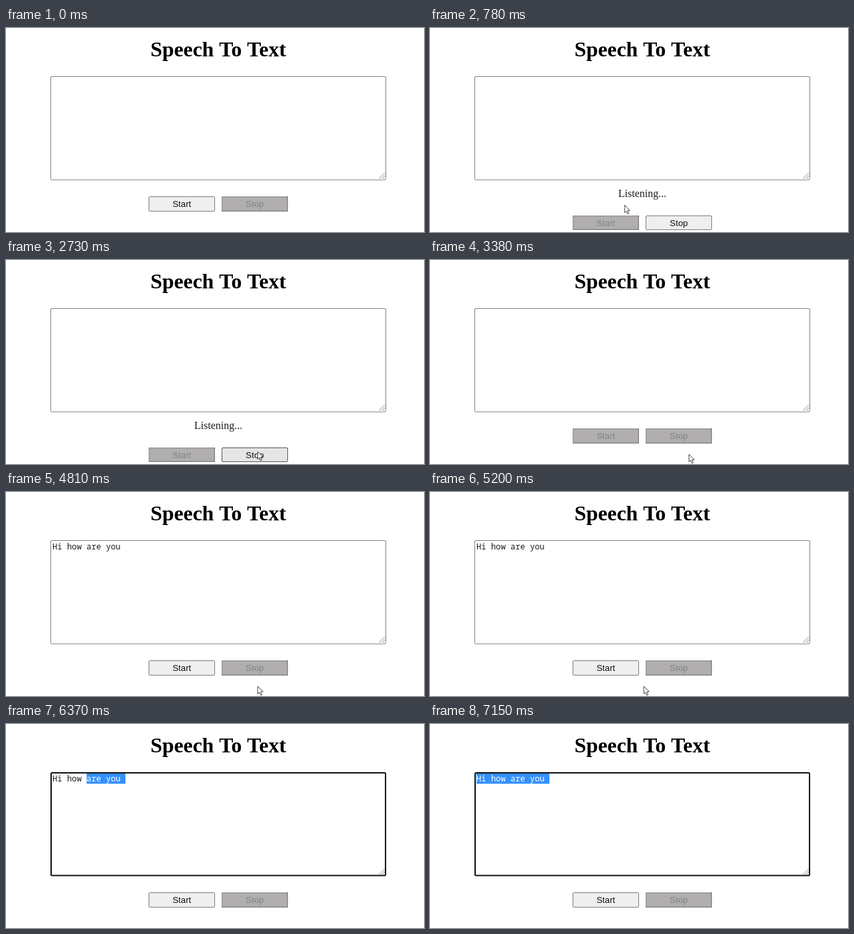
Animation of 630x309 px, one loop 7.67 s. Source, as an HTML page with a canvas:

```html
<!DOCTYPE html>
<html lang="en">
<head>
<meta charset="utf-8">
<title>Speech To Text</title>
<style>
html, body { margin: 0; width: 100%; height: 100%; overflow: hidden; background: #fff; }
canvas { display: block; width: 630px; height: 309px; }
</style>
</head>
<body>
<canvas id="stage" width="630" height="309"></canvas>
<script>
const ctx = document.getElementById('stage').getContext('2d');
const LOOP = 7670, STEP = 130;
const SERIF = '"Liberation Serif", "Times New Roman", serif';
const SANS = '"Liberation Sans", Arial, sans-serif';
const MONO = '"Noto Sans Mono", "DejaVu Sans Mono", monospace';
const PHRASE = 'Hi how are you';
const CHAR = 7.333;

// Moments of the demo, in ms.
const time = {
  enter: 130, start: 520, listen: 780, stop: 2990, quiet: 3380,
  result: 4810, hover: 5720, focus: 6240
};

const moves = [
  { at: time.enter, ms: 260, x: 293, y: 268 },
  { at: 2210, ms: 520, x: 379, y: 290 },
  { at: 2860, ms: 260, x: 390, y: 294 },
  { at: 4680, ms: 520, x: 322, y: 294 },
  { at: 5200, ms: 520, x: 284, y: 240 }
];

const clamp = k => Math.max(0, Math.min(1, k));
const ease = k => k * k * (3 - 2 * k);

function pointerAt(t) {
  if (t < time.enter || t >= time.hover) return null;
  let x = 303, y = 298;
  for (const m of moves) {
    const k = ease(clamp((t - m.at) / m.ms));
    x += (m.x - x) * k;
    y += (m.y - y) * k;
  }
  return { x: Math.round(x), y: Math.round(y) };
}

function text(str, x, y, font, color, align = 'center') {
  ctx.font = font;
  ctx.fillStyle = color;
  ctx.textAlign = align;
  ctx.fillText(str, x, y);
}

function box(x, y, w, h, fill, stroke, line = 1) {
  ctx.beginPath();
  ctx.roundRect(x + line / 2, y + line / 2, w - line, h - line, 1.5);
  ctx.fillStyle = fill;
  ctx.fill();
  ctx.strokeStyle = stroke;
  ctx.lineWidth = line;
  ctx.stroke();
}

function rect(x, y, w, h, color) {
  ctx.fillStyle = color;
  ctx.fillRect(x, y, w, h);
}

function button(label, x, y, h, state) {
  const w = 100, off = state === 'off', hover = state === 'hover';
  if (off) {
    rect(x, y, w, h, '#858383');
    rect(x, y, w - 1.5, h - 1.5, '#9b9999');
    rect(x + 1.5, y + 1.5, w - 3, h - 3, '#b0aeae');
  } else {
    box(x, y, w, h, hover ? '#e5e5e5' : '#efefef', hover ? '#555' : '#7c7c7c');
  }
  text(label, x + w / 2, y + 15.5, '13.333px ' + SANS, off ? '#848282' : '#111');
}

function area(t) {
  const focus = t >= time.focus;
  const edge = focus ? '#101010' : t >= time.hover ? '#686868' : '#808080';
  box(67, 73, 506, 157.5, '#fff', edge, focus ? 2 : 1);

  // Resize grip
  ctx.beginPath();
  for (const size of [8.5, 4]) {
    ctx.moveTo(571 - size, 228);
    ctx.lineTo(571, 228 - size);
  }
  ctx.strokeStyle = '#808080';
  ctx.lineWidth = 1;
  ctx.stroke();

  if (t < time.result) return;
  const font = '12.22px ' + MONO;
  text(PHRASE, 70, 87, font, '#1c1c1c', 'left');

  // The selection is dragged from the end back to the start.
  const total = PHRASE.length + 1;
  const picked = Math.round(total * clamp((t - time.focus) / 260));
  if (!picked) return;
  const left = 70 + (total - picked) * CHAR;
  ctx.save();
  ctx.beginPath();
  ctx.rect(left, 75, picked * CHAR, 15.5);
  ctx.clip();
  rect(left, 75, picked * CHAR, 16, '#3390ff');
  text(PHRASE, 70, 87, font, '#fff', 'left');
  ctx.restore();
}

function arrow({ x, y }) {
  ctx.save();
  ctx.translate(x + 0.3, y + 0.2);
  const shape = new Path2D('M0 0V11.5L2.6 9.2L4.6 13.6L6.4 12.8L4.5 8.6L8 8.3Z');
  ctx.fillStyle = '#fff';
  ctx.fill(shape);
  ctx.strokeStyle = '#333';
  ctx.lineWidth = 0.9;
  ctx.stroke(shape);
  ctx.restore();
}

function draw(t) {
  rect(0, 0, 630, 309, '#fff');
  text('Speech To Text', 320, 43, 'bold 31.8px ' + SERIF, '#000');
  area(t);

  const listening = t >= time.listen && t < time.quiet;
  if (listening) text('Listening...', 320, 255.5, '16px ' + SERIF, '#1c1c1c');

  const y = listening ? 284 : 255, h = listening ? 22 : 23;
  const pos = pointerAt(t);
  const over = x => pos && pos.x >= x && pos.x < x + 100 && pos.y >= y && pos.y < y + h;
  const look = (on, x) => !on ? 'off' : over(x) ? 'hover' : 'on';
  button('Start', 215, y, h, look(t < time.start || t >= time.result, 215));
  button('Stop', 325, y, h, look(t >= time.listen && t < time.stop, 325));
  if (pos) arrow(pos);
}

const begin = performance.now();
function tick() {
  const t = (performance.now() - begin) % LOOP;
  draw(Math.floor(t / STEP) * STEP);
  requestAnimationFrame(tick);
}
tick();
</script>
</body>
</html>
```
